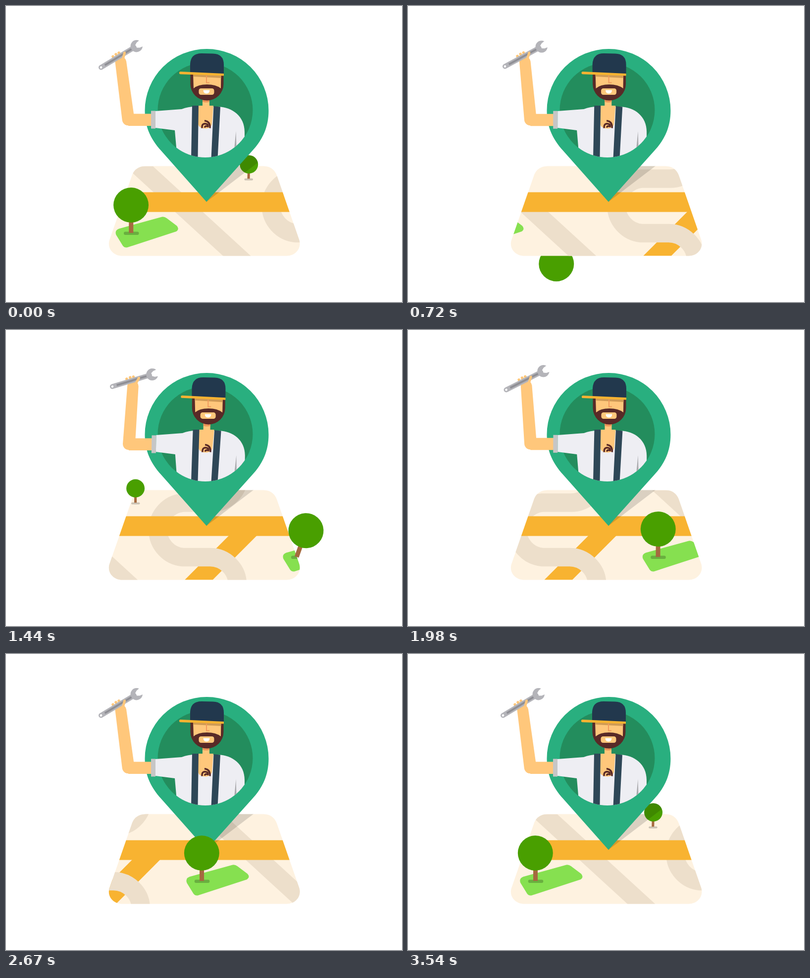
These frames come from a looping animation (800x600 px, 3.57 s). An HTML page:

```html
<!DOCTYPE html>
<html lang="en">
<head>
<meta charset="utf-8">
<title>Handyman map pin</title>
<style>
  html, body { margin: 0; width: 100%; height: 100%; overflow: hidden; background: #fff; }
  svg { display: block; width: 800px; height: 600px; }
</style>
</head>
<body>
<svg viewBox="0 0 800 600">
  <defs>
    <path id="mapShape" d="M282 324.5H520Q540 325 547 343L592 473C598 490 586 506.5 567 506.5H235C216 506.5 203 490 209.5 473L255 342Q262 325 282 324.5Z"/>
    <clipPath id="mapClip"><use href="#mapShape"/></clipPath>
    <clipPath id="crownClip"><circle id="crown" cy="-29" r="18.5"/></clipPath>
    <clipPath id="windowClip"><path d="M0 0H800V250H0Z"/><circle cx="402.5" cy="211" r="96"/></clipPath>
    <path id="pinShade" d="M405 397L597 250H405Z" fill="#000" opacity=".14"/>
    <g id="tile">
      <path d="M241 325H297L495 507H439Z" fill="#eddfcb"/>
      <path d="M678.6 417H735L646 506.5H589.6Z" fill="#f8b331"/>
      <path d="M699.1 294.5A55.5 55.5 0 0 1 643.6 350H585.6A55.5 55.5 0 0 0 585.6 460.5H640.6A55.5 55.5 0 0 1 696.1 516" fill="none" stroke="#eddfcb" stroke-width="37.5"/>
      <path d="M228 451.5L313 428Q319 426 324.5 430L345 445.5Q351 452 344 457L246 489Q240 491 236 486L222.5 464Q219 455 228 451.5Z" fill="#86e050"/>
      <rect x="238" y="457.5" width="30.5" height="6.5" rx="3" opacity=".22"/>
      <rect x="481.5" y="349.5" width="17.5" height="4" rx="2" opacity=".2"/>
    </g>
  </defs>

  <g id="back"></g>
  <use href="#mapShape" fill="#fef2e0"/>
  <g clip-path="url(#mapClip)">
    <g id="scroll"><use href="#tile"/><use href="#tile" x="566.5"/></g>
    <path d="M200 377.5H600V417.5H200Z" fill="#f8b331"/>
    <use href="#pinShade"/>
  </g>
  <g id="middle">
    <g id="smallTree">
      <path d="M-2.5 -14H2.5V0H-2.5Z" fill="#a56a3f"/>
      <circle cy="-29" r="18.5" fill="#499f00"/>
    </g>
  </g>
  <use id="crownShade" href="#pinShade" clip-path="url(#crownClip)"/>

  <path d="M405 397L314 294C292 270 280.5 245 280.5 212A125 125 0 0 1 530.5 212C530.5 245 519 270 498 293Z" fill="#29af7f"/>
  <circle cx="402.5" cy="211" r="96" fill="#238d5d"/>

  <g clip-path="url(#windowClip)">
    <g id="body">
      <path d="M302 213L355 209Q368 204 382 204H428C458 205 482 224 482 255V320H347L341 252L302 247Z" fill="#eeeef3"/>
      <path d="M464.5 254L465.5 284L461 291Z" fill="#a9a9ac"/>
      <path d="M397 185H411V202H419L416 240Q413 248.500 403 248.500Q391 248.500 388 240V202H397Z" fill="#ffc77b"/>
      <path d="M397 189H411V194Q404 197 397 194Z" fill="#eb9558"/>
      <path d="M401 232.500Q413 234 412 247.500M396 247.500Q395 239 402 238.500Q409 239 408 244Q402 242 401.500 246.500" fill="none" stroke="#592a27" stroke-width="3.500"/>
      <path d="M376 202H389L387.500 310H374ZM419.500 203L433 204.500L427.500 310H414.500Z" fill="#2e4757"/>
      <g id="arm">
        <path d="M247 218.500H294V243H247Z" fill="#ffc77b"/>
        <path d="M293 212.500H302V248.500H293Z" fill="#c6c6c6"/>
        <g id="forearm" fill="#ffc77b">
          <path d="M220.500 114Q221 103 232 103Q241 103 243 112L258 218L259 231A12.200 12.200 0 0 1 234.700 231Z"/>
          <g id="hand">
            <path d="M216 102.500L219 107M222 98L226 104M228 95L232 101" stroke="#ffc77b" stroke-width="5.500" stroke-linecap="round"/>
            <g transform="translate(192 124.500) rotate(-31.100)">
              <path d="M0 0H78" stroke="#b4b4b9" stroke-width="10" stroke-linecap="round"/>
              <path d="M9 0H74" stroke="#8f8f95" stroke-width="4"/>
              <circle r="2.300" fill="#fff"/>
              <path d="M93.800 -7A12.200 12.200 0 1 0 93.800 7L87.500 6L82.500 3V-3L87.500 -6Z" fill="#b4b4b9"/>
            </g>
            <path d="M236 109L239.500 95" stroke="#ffc77b" stroke-width="5" stroke-linecap="round"/>
          </g>
        </g>
      </g>
    </g>
    <g id="head">
      <path d="M372.500 136H439.500V158A33.500 33.500 0 0 1 372.500 158Z" fill="#592a27"/>
      <path d="M378 136H434.500L434 167Q424 159 406 159Q388 159 379 167Z" fill="#ffc77b"/>
      <path d="M378 137H434.500V146L378 143Z" fill="#d09b55"/>
      <path d="M405 141V155.500H411" fill="none" stroke="#f19a5e" stroke-width="2"/>
      <rect x="389.500" y="167" width="31" height="13" rx="4.500" fill="#ffc77b"/>
      <path d="M398.500 170.500H411.500Q411 177.500 405 177.500Q399 177.500 398.500 170.500Z" fill="#fff"/>
      <path d="M372 135V118Q373 96 395 96L418 96.500Q440 97 440 119V138Z" fill="#22384d"/>
      <path d="M352.500 133L440 137V141.500L352.500 138.200A2.600 2.600 0 0 1 352.500 133Z" fill="#f8b331"/>
    </g>
  </g>

  <g id="front">
    <g id="bigTree">
      <path d="M-4.300 -25H4.700V0H-4.300Z" fill="#a56a3f"/>
      <circle cy="-56.500" r="35.500" fill="#499f00"/>
    </g>
  </g>
</svg>
<script>
  const LOOP = 3570, STEP = 30, SPAN = 566.5, SPEED = SPAN / LOOP;
  const $ = id => document.getElementById(id);
  const place = (id, transform) => $(id).setAttribute('transform', transform);
  const clamp01 = x => Math.min(1, Math.max(0, x));

  // A tree tips over the left edge, travels under the map and springs up on the right.
  function treePose(t, { start, left, right, ground, dip }) {
    const age = (t - start + LOOP) % LOOP;
    const rejoin = (SPAN - right + left) / SPEED;
    const rise = rejoin - 341;
    const under = clamp01((age - 330) / (rejoin - 580));
    const sag = clamp01((age - 297) / (rejoin - 704));
    const x = age < rejoin ? left + (right - left) * under : left + SPAN - SPEED * age;
    const angle = age < rise ? -Math.min(180, age / 2) : 180 * Math.exp((rise - age) * 0.00695);
    return { x, y: ground + dip * Math.sin(Math.PI * sag), angle };
  }

  function drawTree(id, layer, t, route) {
    const { x, y, angle } = treePose(t, route);
    const parent = $(Math.abs(angle) > 95 ? 'back' : layer);
    const transform = `translate(${x} ${y}) rotate(${angle})`;
    if ($(id).parentNode !== parent) parent.append($(id));
    place(id, transform);
    return { transform, visible: parent.id !== 'back' };
  }

  function wave(t) {
    const phase = t / LOOP * 4 % 1;
    const u = 1 - Math.abs(1 - 2 * phase);
    return u < 0.5 ? 8 * u ** 4 : 1 - 8 * (1 - u) ** 4;
  }

  function render(now) {
    const t = Math.floor(now % LOOP / STEP) * STEP;
    place('scroll', `translate(${-SPEED * t})`);

    const small = drawTree('smallTree', 'middle', t, { start: 1494, left: 253, right: 549, ground: 350, dip: 0 });
    place('crown', small.transform);
    $('crownShade').style.display = small.visible ? '' : 'none';
    drawTree('bigTree', 'front', t, { start: 243, left: 214, right: 587, ground: 460, dip: 7 });

    const p = wave(t), lean = 0.016 * p;
    place('body', `matrix(1 0 ${-lean} 1 ${305 * lean} 0)`);
    place('head', `translate(${3.1 * p}) rotate(${0.4 * p} 405 190)`);
    place('arm', `translate(0 ${p})`);
    place('forearm', `rotate(${10.7 * p} 247 231)`);
    place('hand', `rotate(${3.7 * p} 232 110)`);
    requestAnimationFrame(render);
  }
  render(0);
</script>
</body>
</html>
```
